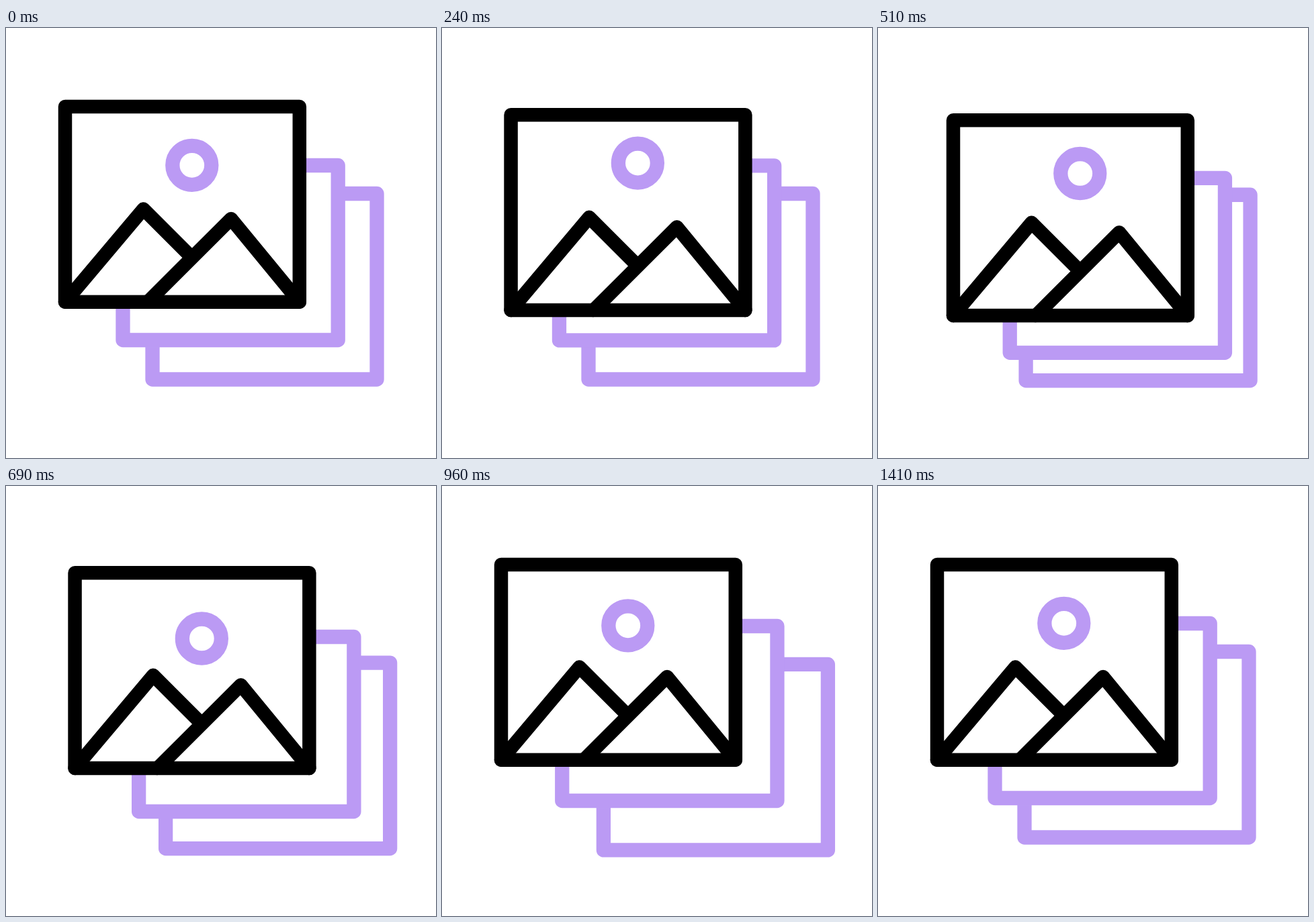
These frames come from a looping animation (640x640 px, 1590 ms). An HTML page:

```html
<!DOCTYPE html>
<html lang="en">
<head>
<meta charset="utf-8">
<title>Picture stack</title>
<style>
  html, body { margin: 0; width: 100%; height: 100%; overflow: hidden; background: #fff; }
  svg { display: block; width: 100%; height: 100%; }
  .line { fill: #fff; stroke-linejoin: round; stroke-linecap: round; }
  .black { stroke: #000; stroke-width: 20.5; }
  .lilac { stroke: #bb9af4; stroke-width: 21.3; }
  .open { fill: none; }
</style>
</head>
<body>
<svg viewBox="0 0 640 640">
  <rect id="back" class="line lilac" x="218" y="246.5" width="334" height="276.5"/>
  <rect id="middle" class="line lilac" x="174" y="204.5" width="320.2" height="260"/>
  <g id="front">
    <rect class="line black" x="88" y="117" width="348.8" height="290.7"/>
    <path class="line black open" d="M88 407.7 L204.5 269.5 L277 342 M211 407.7 L335 284 L436.8 407.7"/>
    <circle id="sun" class="line lilac open" cx="276.8" cy="204.3" r="29"/>
  </g>
</svg>
<script>
  const STEP = 30, STEPS = 53;
  const SHIFT = { x: 24, y: 20.3 };

  // Keys are [step, value] pairs, eased in and out between neighbours.
  const cards = {
    front:  [[0, 0], [14, 1], [17, 1], [31, 0]],
    middle: [[7, 0], [19, 1], [22, 1], [36, 0]],
    back:   [[15, 0], [26, 1], [30, 1], [42.6, 0]]
  };
  const sunKeys = [[0, 0], [11.5, -20], [24.8, 12], [36, 0]];

  const el = id => document.getElementById(id);
  const ease = u => u * u * (3 - 2 * u);
  const move = (id, x, y) => el(id).setAttribute('transform', `translate(${x} ${y})`);

  function valueAt(keys, t) {
    if (t <= keys[0][0]) return keys[0][1];
    for (let i = 1; i < keys.length; i++) {
      const [t0, a] = keys[i - 1], [t1, b] = keys[i];
      if (t < t1) return a + (b - a) * ease((t - t0) / (t1 - t0));
    }
    return keys[keys.length - 1][1];
  }

  function draw(step) {
    for (const id in cards) {
      const k = valueAt(cards[id], step);
      move(id, k * SHIFT.x, k * SHIFT.y);
    }
    move('sun', 0, valueAt(sunKeys, step));
  }

  const start = performance.now();
  function tick() {
    draw(Math.floor((performance.now() - start) / STEP) % STEPS);
    requestAnimationFrame(tick);
  }
  tick();
</script>
</body>
</html>
```
